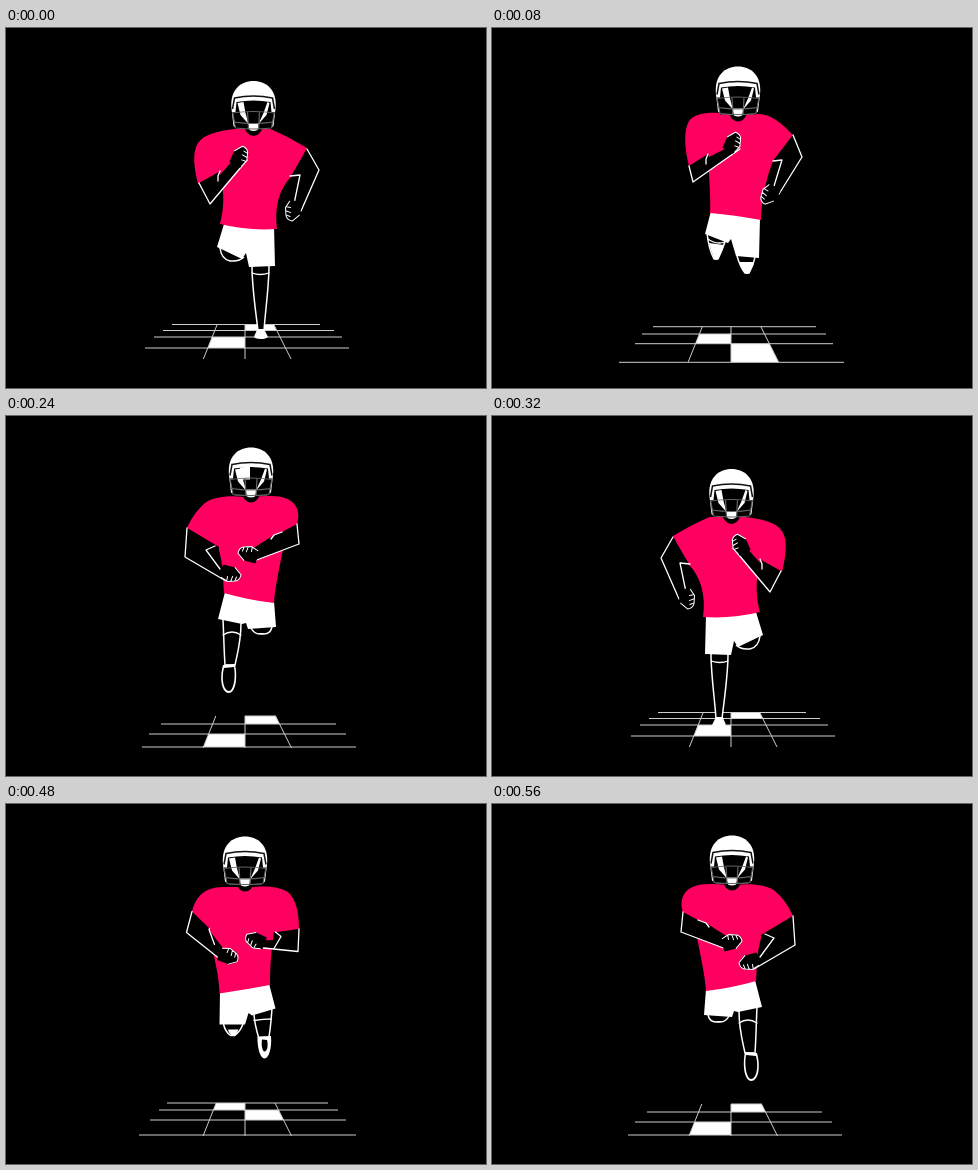
Write an HTML page that moves like this. It is 480 px wide and 360 px high and loops after 640 ms.

```html
<!DOCTYPE html>
<html lang="en">
<head>
<meta charset="utf-8">
<title>Running player</title>
<style>
  html, body { margin: 0; width: 100%; height: 100%; overflow: hidden; background: #000; }
  svg { display: block; width: 100vw; height: 100vh; }
  .step { visibility: hidden; animation: show 640ms step-end infinite; }
  @keyframes show { 0% { visibility: visible; } 12.5%, 100% { visibility: hidden; } }
  .pink { fill: #ff0060; }
  .white { fill: #fff; }
  .black { fill: #000; }
  .limb { fill: #000; stroke: #fff; stroke-width: 1.5; stroke-linejoin: round; }
  .line { fill: none; stroke: #fff; stroke-width: 1.3; stroke-linejoin: round; stroke-linecap: round; }
  .thin { fill: none; stroke: #fff; stroke-width: 1; stroke-linejoin: round; stroke-linecap: round; }
  .dark { fill: none; stroke: #111; stroke-width: 1.5; }
  .bars { fill: none; stroke: #666; stroke-width: 1.2; }
  .grid { fill: none; stroke: #ccc; stroke-width: 1; }
</style>
</head>
<body>
<svg id="stage" viewBox="0 0 480 360"></svg>
<script>
const STEP = 80, STEPS = 8, MIRROR = 482;

const plant = {
  jersey: "M229 101C212 103 198 106 192 115C186 124 188 140 192 156L213 144C220 165 217 185 214 196Q242 203 271 201C268 180 273 160 286 148L301 120C286 111 272 104 264 101Z",
  shorts: "M218 196L211 219L236 231L240 225L243 239L269 238L268 199Z",
  leftLeg: "M214 220C215 228 219 232 224 233L227 233C232 233 236 231 238 229",
  rightLeg: "M246 238C246 260 250 285 252 303L258 303C259 285 263 260 263 237",
  leftFoot: "",
  rightFoot: "M251 301C250 306 247 308 249 310C254 312 260 311 262 309L258 301Z",
  sole: "",
  sock: "M246 245Q254 248 263 245",
  leftOuter: "M193 155L204 176L241 132",
  leftInner: "L228 131L212 149L213 144",
  rightOuter: "M301 121L313 142L295 183",
  rightInner: "L287 177L293 148L285 148",
  crease: "M284 148L294 147L288 176M214 143L212 148L212 153",
  leftHand: "translate(234 128) rotate(20)",
  rightHand: "translate(287 183) rotate(-170)"
};

const lift = {
  jersey: "M229 85C214 84 202 86 197 93C191 103 193 122 197 138L216 127C217 150 219 170 218 185Q242 187 269 192C269 175 274 150 281 133L301 107C290 96 280 86 266 86Z",
  shorts: "M219 183L213 206L236 215L239 211L244 228L267 230L268 190Z",
  leftLeg: "M215 205C216 214 217 222 222 231L226 231C229 224 232 218 233 213",
  rightLeg: "M245 228C247 235 249 240 253 245L257 245C260 240 262 235 263 229",
  leftFoot: "M217 215C219 223 222 232 224 232C227 232 230 223 232 217Z",
  rightFoot: "M247 234C250 241 253 246 255 246C257 246 260 241 262 234Z",
  sole: "M224 220C224 220 224 220 224 220C224 220 224 220 224 220Z",
  sock: "M216 211Q224 217 233 214",
  leftOuter: "M197 138L201 154L248 121",
  leftInner: "L233 121L217 129L216 126",
  rightOuter: "M301 107L310 129L287 166",
  rightInner: "L281 159L290 133L281 133",
  crease: "M281 133L290 132L282 158M216 126L214 131L214 136",
  leftHand: "translate(241 114) rotate(20)",
  rightHand: "translate(277 167) rotate(-150)"
};

const reach = {
  jersey: "M237 81C222 79 205 82 199 87C190 95 185 103 181 112L212 131C218 150 217 165 218 177Q242 184 268 187C269 170 274 150 278 128L291 109C296 92 288 79 262 80Z",
  shorts: "M219 176L212 203L236 208L240 207L242 213L270 211L268 185Z",
  leftLeg: "M217 203C218 225 218 235 219 249L229 249C232 235 235 225 235 207",
  rightLeg: "M245 212C247 216 250 218 254 218L258 218C262 218 265 215 266 211",
  leftFoot: "M217 249C213 264 216 277 223 277C229 277 232 263 229 248Z",
  rightFoot: "M252 217C252 218 254 218 255 218C256 218 258 218 258 217Z",
  sole: "M218 252C215 264 218 275 223 275C227 275 230 263 228 251Z",
  sock: "M217 219Q226 213 235 219",
  leftOuter: "M181 112L179 141L220 165",
  leftInner: "L218 152L211 143L213 131",
  rightOuter: "M291 108L293 128L248 145",
  rightInner: "L246 133L268 119L276 116",
  crease: "M276 116L268 119L265 123M209 130L200 134L214 153",
  leftHand: "translate(225 158) rotate(100)",
  rightHand: "translate(242 138) rotate(-80)"
};

// Both strings share one command structure, so only the numbers are blended.
function blend(a, b) {
  const ends = b.match(/-?\d+/g);
  let i = 0;
  return a.replace(/-?\d+/g, n => (+n + +ends[i++]) / 2);
}
const swing = Object.fromEntries(Object.keys(lift).map(k => [k, blend(lift[k], reach[k])]));

// Floor lines are [y, left end, right end]; cells name the white side of each row.
const phases = [
  { pose: plant, heads: [[247.5, 53], [239.5, 53]], cells: "R-L", bottom: 331,
    rows: [[296.5, 166, 314], [302.5, 157, 328], [309, 148, 336], [320, 139, 343]] },
  { pose: lift, heads: [[246, 38.5], [238, 38.5]], cells: "-LR", bottom: 334,
    rows: [[298.7, 161, 324], [306, 150, 334], [315.7, 143, 341], [334.3, 127, 352]] },
  { pose: swing, heads: [[245.5, 32.5], [239, 32.5]], cells: "LR-", bottom: 332,
    rows: [[299, 161, 322], [306, 153, 332], [316, 144, 340], [331, 133, 350]] },
  { pose: reach, heads: [[245, 31.5], [240, 31.5]], cells: "R-L", bottom: 332,
    rows: [[300, 239, 270], [308, 155, 330], [318, 143, 340], [331, 136, 350]] }
];

const path = (cls, d) => `<path class="${cls}" d="${d}"/>`;
const leftX = y => 211 - (y - 297) * 0.4;
const rightX = y => 268 + (y - 297) * 0.5;

function floor({ rows, cells, bottom }) {
  const top = rows[0][0];
  const tiles = [...cells].map((side, i) => {
    const a = rows[i][0], b = rows[i + 1][0];
    if (side === "-") return "";
    const edge = side === "L" ? leftX : rightX;
    return path("white", `M239 ${a}H${edge(a)}L${edge(b)} ${b}H239Z`);
  }).join("");
  const across = rows.map(([y, x1, x2]) => `M${x1} ${y}H${x2}`).join("");
  const along = [leftX, () => 239, rightX]
    .map(x => `M${x(top)} ${top}L${x(bottom)} ${bottom}`).join("");
  return tiles + path("grid", across + along);
}

const hand = transform => `<g transform="${transform}">` +
  path("black", "M-8 9L-7 -4L-1 -10Q4 -10 7 -5L8 3L4 11Z") +
  path("thin", "M-7 -3L-1 -10Q4 -10 6 -6L8 2L5 9M2 -6L6 -5M2 -2L7 -1M3 3L7 3") + "</g>";

const arm = (outer, inner) => path("black", outer + inner) + path("line", outer);

function body(p) {
  return path("limb", p.leftLeg) + path("limb", p.rightLeg) +
    path("white", p.leftFoot) + path("white", p.rightFoot) +
    path("black", p.sole) + path("line", p.sock) +
    path("white", p.shorts) + path("pink", p.jersey) +
    arm(p.leftOuter, p.leftInner) + arm(p.rightOuter, p.rightInner) +
    path("line", p.crease) + hand(p.leftHand) + hand(p.rightHand);
}

function helmet([x, y], glint) {
  return `<g transform="translate(${x} ${y})">` +
    path("black", "M-10 44Q-7 55 0 55Q7 55 10 44Z") +
    path("white", "M-22 28C-24 9 -13 0 0 0C13 0 24 9 22 28L20 45L16 48H-16L-20 45Z") +
    path("dark", "M-21 28L-19 17Q0 13 19 17L21 28") +
    path("black", "M-17 21Q0 18 17 21L18 31H21L18 48H-18L-21 31H-18Z") +
    path("white", "M-16 22L-10 21L-8 32L-5 43L-13 34Z M16 22L14 21L10 32L5 43L13 34Z") +
    (glint ? path("white", "M-11 20L-1 19V32H-11Z") : "") +
    path("white", "M-6 42H6L4 49Q0 51 -4 49Z") +
    path("bars", "M-21 32Q0 29 21 32M-20 41Q0 44 20 41M-18 47Q0 49 18 47M-21 31L-18 47M21 31L18 47M-6 31L-5 48M6 31L5 48") +
    "</g>";
}

let scene = "";
for (let i = 0; i < STEPS; i++) {
  const phase = phases[i % 4], flipped = i >= 4;
  const flip = flipped ? ` transform="translate(${MIRROR} 0) scale(-1 1)"` : "";
  scene += `<g class="step" style="animation-delay:${(i - STEPS) * STEP}ms">` +
    floor(phase) + `<g${flip}>${body(phase.pose)}</g>` +
    helmet(phase.heads[+flipped], i === 3) + "</g>";
}
document.getElementById("stage").innerHTML = scene;
</script>
</body>
</html>
```
